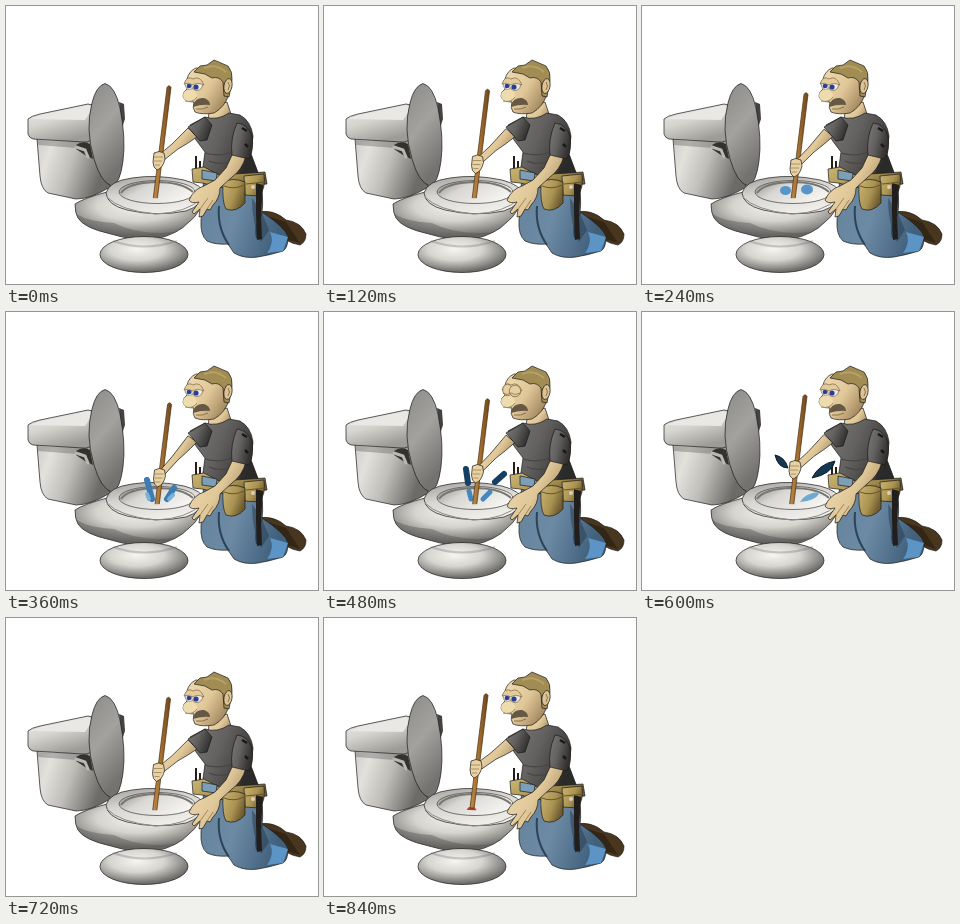
An HTML page for the animation above (960 ms loop, 312 by 278 pixels).

```html
<!DOCTYPE html>
<html lang="en">
<head>
<meta charset="utf-8">
<title>Plumber with a plunger</title>
<style>
html, body { margin: 0; width: 100%; height: 100%; overflow: hidden; background: #fff; }
svg { display: block; width: 100%; height: 100%; }
.scene { --x: 0; --y: 0; animation: plunge 960ms step-end infinite; }
.pole { transform: translate(calc(var(--x) * 1px), calc(var(--y) * 1px)); }
.forearm { transform-origin: 188px 124px; transform: skewY(calc(var(--y) * -1.55deg)); }
.beat { visibility: hidden; animation: beat 960ms step-end infinite; animation-delay: calc(var(--n) * 120ms - 960ms); }
.line { stroke: #1c1b19; stroke-width: .7; stroke-linejoin: round; }
.drops { fill: none; stroke-width: 6; stroke-linecap: round; }
@keyframes plunge {
  0% { --x: 0; --y: 0; }
  12.5% { --x: .5; --y: 3.5; }
  25% { --x: 1; --y: 7; }
  37.5% { --x: .5; --y: 11; }
  50% { --x: .5; --y: 7; }
  62.5% { --x: 0; --y: 3; }
  75% { --x: -.5; --y: -.5; }
  87.5%, 100% { --x: -1; --y: -4; }
}
@keyframes beat {
  0% { visibility: visible; }
  12.5%, 100% { visibility: hidden; }
}
</style>
</head>
<body>
<svg viewBox="0 0 312 278" preserveAspectRatio="none">
<defs>
  <linearGradient id="tank" x2="1" y2=".4">
    <stop stop-color="#c4c3be"/><stop offset=".3" stop-color="#e2e1dc"/><stop offset=".6" stop-color="#bfbeb9"/><stop offset="1" stop-color="#6c6b68"/>
  </linearGradient>
  <linearGradient id="cap" x2=".5" y2="1">
    <stop stop-color="#eeede9"/><stop offset=".5" stop-color="#d5d4cf"/><stop offset="1" stop-color="#9c9b97"/>
  </linearGradient>
  <linearGradient id="seat" x2=".4" y2="1">
    <stop stop-color="#8b8b87"/><stop offset=".5" stop-color="#a3a29e"/><stop offset="1" stop-color="#73726f"/>
  </linearGradient>
  <radialGradient id="bowl" cx=".48" cy=".3" r=".62">
    <stop stop-color="#f3f2ee"/><stop offset=".5" stop-color="#d5d4cf"/><stop offset="1" stop-color="#72716d"/>
  </radialGradient>
  <radialGradient id="foot" cx=".42" cy=".35" r=".62">
    <stop stop-color="#f6f5f1"/><stop offset=".5" stop-color="#d6d5d0"/><stop offset="1" stop-color="#716f6c"/>
  </radialGradient>
  <linearGradient id="rim" x2=".5" y2="1">
    <stop stop-color="#9d9c98"/><stop offset=".45" stop-color="#d6d5d1"/><stop offset="1" stop-color="#efeeea"/>
  </linearGradient>
  <linearGradient id="well" x2="1" y2=".5">
    <stop stop-color="#898884"/><stop offset=".4" stop-color="#d8d7d3"/><stop offset="1" stop-color="#f5f4f1"/>
  </linearGradient>
  <linearGradient id="skin" x2="1" y2=".6">
    <stop stop-color="#f0deb4"/><stop offset=".6" stop-color="#e0c798"/><stop offset="1" stop-color="#a58a61"/>
  </linearGradient>
  <linearGradient id="shirt" x2="1" y2=".4">
    <stop stop-color="#7b7a79"/><stop offset=".5" stop-color="#626160"/><stop offset="1" stop-color="#333231"/>
  </linearGradient>
  <linearGradient id="jeans" x2="1" y2=".3">
    <stop stop-color="#66839b"/><stop offset=".5" stop-color="#6c8aa4"/><stop offset="1" stop-color="#41607c"/>
  </linearGradient>
  <linearGradient id="leather" x2="1" y2=".5">
    <stop stop-color="#cbb573"/><stop offset=".6" stop-color="#ab9453"/><stop offset="1" stop-color="#6f5c2f"/>
  </linearGradient>
  <linearGradient id="wood" x2="1" y2=".08">
    <stop stop-color="#c08d4b"/><stop offset=".5" stop-color="#a8722f"/><stop offset="1" stop-color="#6b431a"/>
  </linearGradient>
  <clipPath id="opening"><path d="M0 0H312V187H186Q165 193 145 192Q120 190 112 186H0Z"/></clipPath>
</defs>

<g class="scene">
  <!-- cistern and raised lid -->
  <path class="line" fill="url(#tank)" d="M31 133L34 170Q35 183 42 187L70 193Q85 193 104 181L88 110Z"/>
  <path d="M31 134L82 136L83 143L32 139Z" fill="#555" opacity=".35"/>
  <path class="line" fill="url(#cap)" d="M22 113Q25 110 34 108L82 98Q87 98 90 102L89 130Q84 137 77 136L27 133Q23 132 22 128Z"/>
  <path d="M24 113L35 109L82 99L87 102L79 114Z" fill="#e9e8e4"/>
  <path d="M70 139Q77 134 84 138L87 153L79 149L70 143Z" fill="#33322f"/>
  <path d="M70 141L79 144L82 151" fill="none" stroke="#b9b8b3" stroke-width="3" stroke-linecap="round"/>

  <!-- bowl -->
  <path class="line" fill="url(#bowl)" d="M69 198Q78 192 101 186L197 190Q196 206 183 216Q172 228 150 233Q127 235 105 228Q78 222 72 212Q69 207 69 198Z"/>
  <path d="M70 208Q84 216 108 217Q134 230 168 226Q152 234 130 233Q110 230 97 226Q75 221 70 208Z" fill="#504f4b" opacity=".4"/>
  <ellipse class="line" cx="138" cy="248.500" rx="44" ry="18" fill="url(#foot)"/>
  <path d="M107 235Q138 246 171 235" fill="none" stroke="#777" stroke-width="2" opacity=".35"/>
  <path d="M113 96L118 98L119 113L116 122Z" fill="#44433f"/>
  <path class="line" fill="url(#seat)" d="M99 77.500Q109 80 114 102Q120 132 117 155Q114 178 106 180Q95 177 88 153Q79 123 86 97Q90 80 99 77.500Z"/>
  <path class="line" fill="url(#rim)" d="M100 187Q103 175 126 172Q150 168 178 174Q197 179 198 188Q197 199 180 205Q151 211 121 204Q101 199 100 187Z"/>
  <ellipse cx="151" cy="186" rx="38" ry="11.500" fill="url(#well)" stroke="#55544f" stroke-width=".8"/>
  <path d="M115 187Q122 177 149 176Q176 176 187 186" fill="none" stroke="#777671" stroke-width="2"/>
  <path d="M101 191Q113 204 149 208Q181 207 196 192" fill="none" stroke="#8d8c87" stroke-width="1"/>

  <!-- kneeling legs -->
  <path class="line" fill="#49361f" d="M252 206Q268 203 280 214Q295 216 300 228Q300 236 294 239Q287 238 280 234L255 228Z"/>
  <path d="M258 209L280 216L294 237L281 233Z" fill="#271b10" opacity=".6"/>
  <path class="line" fill="url(#jeans)" d="M198 168L254 175Q258 192 256 206Q280 222 282 231Q282 242 277 245Q264 249 252 251Q238 253 228 247L222 238Q210 239 201 235Q194 229 195 214Z"/>
  <path d="M264 226L282 231L277 245L261 247Q269 236 264 226Z" fill="#5c94c5"/>
  <path d="M213 200Q211 222 223 239M256 207Q248 220 251 232" fill="none" stroke="#2c4358" stroke-width="2"/>
  <path d="M246 192L255 205L263 224L255 236Q246 218 246 192Z" fill="#263a4c" opacity=".5"/>

  <!-- torso -->
  <path class="line" fill="url(#skin)" d="M204 101L221 96L226 111L212 119L202 113Z"/>
  <path class="line" fill="url(#shirt)" d="M184 119L199 111Q211 115 223 107L234 109Q245 115 247 130L245 148L253 169L237 174L196 168L199 146L190 134Z"/>
  <path d="M199 147Q211 151 227 146M203 155Q214 160 228 155" fill="none" stroke="#474644" stroke-width="1.200"/>
  <path d="M239 145L246 150L253 169L232 174Z" fill="#222" opacity=".5"/>

  <!-- tool belt -->
  <path d="M190 150V165M194 155V167" stroke="#251d18" stroke-width="2"/>
  <g class="line">
    <path fill="url(#leather)" d="M186 163L198 161L213 169L259 166L261 178L218 182L196 177L187 176Z"/>
    <path fill="#7c9eb8" d="M196 164L211 167L210 175L196 173Z"/>
    <path fill="url(#leather)" d="M238 170L258 168Q260 183 253 190L239 189Z"/>
    <path fill="url(#leather)" d="M217 176Q227 171 239 176L239 197Q230 207 220 203Q216 197 217 176Z"/>
  </g>
  <path d="M250 177L257 179L255 209L256 233L251 234L250 207Z" fill="#211e1b"/>
  <path d="M218 180Q228 184 238 179M240 178L259 176" fill="none" stroke="#6b5628"/>
  <circle cx="247" cy="181" r="2" fill="#d8cfb8"/>

  <!-- supporting arm -->
  <path class="line" fill="url(#skin)" d="M227 147L240 150Q236 164 226 171L214 182Q214 192 207 199L204 204L201 203L197 210L193 211L194 203L188 208L186 206L193 196Q185 198 183 194Q188 183 198 180L209 174L220 162Z"/>
  <path d="M194 203L202 192M201 203L207 194" fill="none" stroke="#a1865c"/>
  <path class="line" fill="url(#shirt)" d="M231 117Q242 118 246 130Q248 144 243 153L226 149Q224 133 231 117Z"/>
  <path d="M236 122l5 3M239 138l3 3" stroke="#19191b" stroke-width="2.500"/>

  <!-- head -->
  <path class="line" fill="url(#skin)" d="M181 73Q183 65 190 62L218 64L223 88Q219 101 208 107Q196 109 189 106Q186 102 188 96Q178 96 177 90Q177 86 181 83Z"/>
  <path class="line" fill="#a18d54" d="M188 66L194 60L201 59L208 54L222 60Q227 66 226 74L223 91L218 90L217 76Q213 70 206 72L199 68Z"/>
  <path d="M198 62Q210 57 220 66" fill="none" stroke="#b5a168" stroke-width="2"/>
  <ellipse class="line" cx="222" cy="80" rx="4" ry="7.500" fill="#dcc394" transform="rotate(10 222 80)"/>
  <path d="M222 76q3 4 0 8" fill="none" stroke="#8c734c"/>
  <path d="M187 99Q190 91 198 92Q204 94 204 99Q196 98 187 101Z" fill="#655844"/>
  <path d="M190 103Q197 104 202 101" fill="none" stroke="#8b714c"/>
  <g stroke="#6b5839" stroke-width=".6" fill="#ecebe6">
    <ellipse cx="183.500" cy="78" rx="4.500" ry="5.500"/>
    <ellipse cx="191" cy="79" rx="5.500" ry="5.500"/>
  </g>
  <g fill="#2a3c93">
    <circle cx="183" cy="80" r="2.300"/>
    <circle cx="190" cy="81" r="2.600"/>
  </g>
  <path d="M178 78Q181 69 187 73Q194 69 198 79Q191 76 187 79Q182 76 178 78Z" fill="#e3cb9c" stroke="#7c6743" stroke-width=".7"/>
  <ellipse cx="184" cy="89.500" rx="7" ry="6" fill="#eedbae"/>
  <path d="M179 95Q187 97 191 91" fill="none" stroke="#a48a5e"/>
  <g class="beat" style="--n:4" stroke="#7c6743" stroke-width=".7" fill="#e6cfa0">
    <ellipse cx="183.500" cy="78" rx="4.800" ry="5.700"/>
    <ellipse cx="191" cy="79" rx="5.700" ry="5.700"/>
    <path d="M179 81Q183 84 187 81Q191 84 196 81" fill="none"/>
  </g>

  <!-- splashes -->
  <g class="beat" style="--n:2" fill="#5795c8">
    <ellipse cx="143.500" cy="184.500" rx="5.500" ry="4.500"/>
    <ellipse cx="165" cy="183.500" rx="6" ry="5"/>
  </g>
  <g class="beat drops" style="--n:3">
    <path d="M141 168L146 187M168 176L161 187" stroke="#3b7cb3"/>
    <path d="M141 182L143 187M167 183L163 187" stroke="#7db0d6" stroke-width="4"/>
  </g>
  <g class="beat drops" style="--n:4">
    <path d="M142 157L144 171M180 162L171 170" stroke="#153f63"/>
    <path d="M145 179L147 187M166 180L159 187" stroke="#4688bd" stroke-width="5"/>
  </g>
  <g class="beat" style="--n:5">
    <path d="M133 143Q143 145 146 156Q136 156 133 143ZM170 166Q177 152 193 149Q190 162 170 166Z" fill="#173650" stroke="#0d1e2e"/>
    <path d="M158 190Q163 181 177 180Q176 188 158 190Z" fill="#70a9cf"/>
  </g>

  <!-- plunger and gripping arm -->
  <g clip-path="url(#opening)">
    <g class="pole">
      <path d="M143 198Q144 193 148.500 192.500Q153 193 154 198Z" fill="#b23c2c"/>
      <path d="M161 81.500Q163 78 165 81.500L151.200 194H147Z" fill="url(#wood)" stroke="#4d3012" stroke-width=".7"/>
    </g>
  </g>
  <g class="forearm">
    <path class="line" fill="url(#skin)" d="M182 122L191 131Q181 138 172 143L158 154L153 149L166 138Z"/>
  </g>
  <g class="pole">
    <path class="line" fill="#e8d2a4" d="M148 147Q153 144 158 147L159 153Q157 162 151 164Q147 162 147 156Z"/>
    <path d="M148 151H157M148 155H156M149 159H154" stroke="#9b8054" stroke-width=".8"/>
  </g>
  <path class="line" fill="url(#shirt)" d="M182 121L199 111L206 119L201 134L194 135Z"/>
</g>
</svg>
</body>
</html>
```
